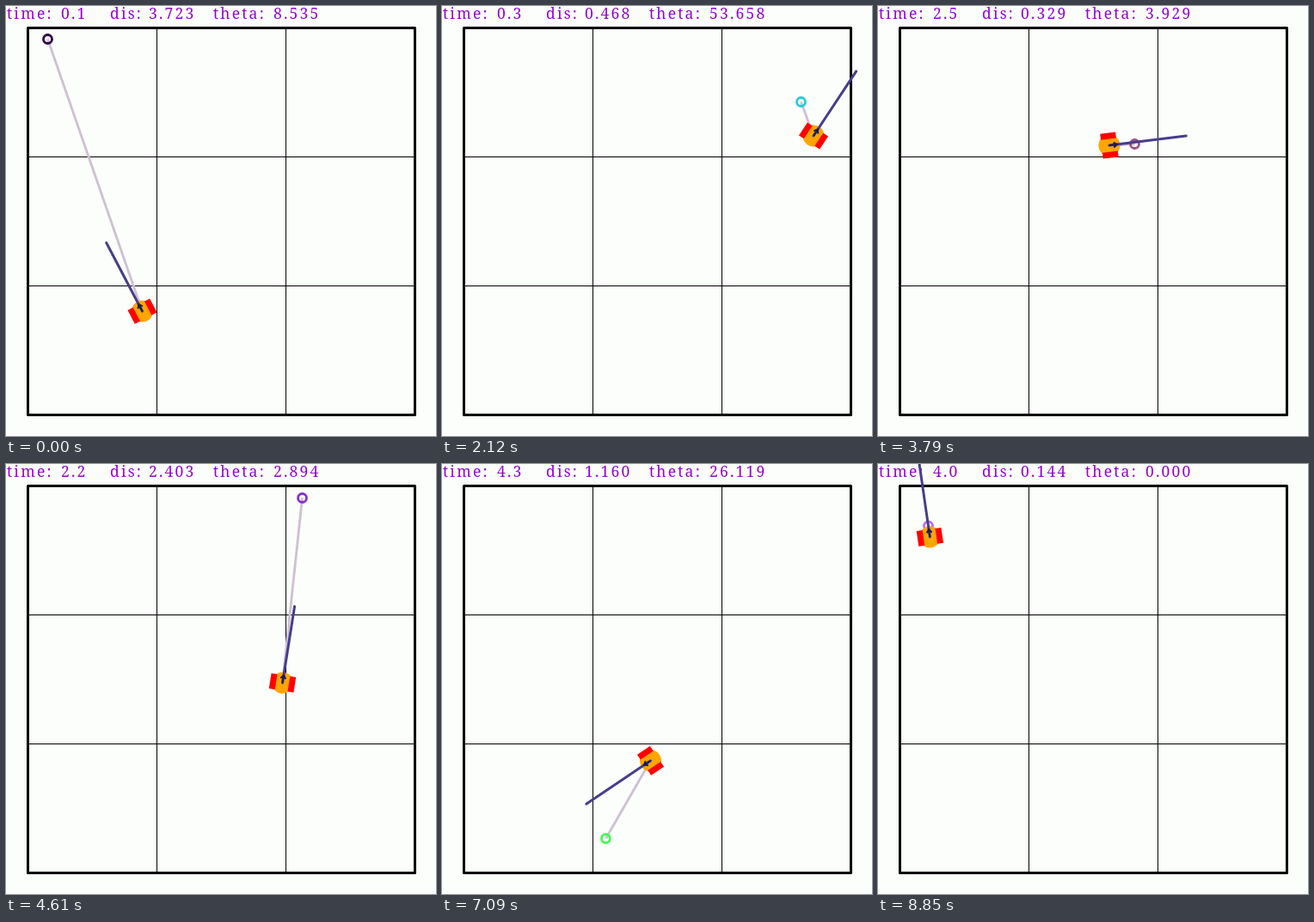
Recreate the animation shown at these times as an HTML page. Size 500 by 500 pixels, loop 8880 ms.

```html
<!DOCTYPE html>
<html lang="en">
<head>
<meta charset="utf-8">
<title>Robot steering to goals</title>
<style>
  html, body { margin: 0; width: 100%; height: 100%; overflow: hidden; background: #fcfefc; }
  svg { display: block; width: 500px; height: 500px; }
  text { font: 17.5px "Noto Serif", serif; letter-spacing: 2.2px; fill: #9400d3; }
</style>
</head>
<body>
<svg viewBox="0 0 500 500">
  <path d="M175.5 25V475M325.5 25V475M25 175.5H475M25 325.5H475" stroke="#000"/>
  <rect x="25.5" y="25.5" width="450" height="450" fill="none" stroke="#000" stroke-width="3" stroke-linejoin="round"/>
  <text x="1" y="15">time:</text><text id="time" x="64" y="15"></text>
  <text x="121" y="15">dis:</text><text id="dis" x="166" y="15"></text>
  <text x="241" y="15">theta:</text><text id="theta" x="311" y="15"></text>
  <line id="sight" stroke="#cfc0d3" stroke-width="2.8"/>
  <circle id="goal" r="5" fill="none" stroke-width="2.8"/>
  <g id="robot">
    <circle r="12.5" fill="#ffa500"/>
    <path d="M-14.5-9h7v18h-7zM7.5-9h7v18h-7z" fill="#f00"/>
    <path d="M0 0V-90" stroke="#483d8b" stroke-width="3" stroke-linecap="round"/>
    <path d="M-3-5L0-9L3-5M0 0V-9" fill="none" stroke="#1c1a55" stroke-width="2"/>
  </g>
</svg>
<script>
const LOOP = 8880, STEPS = 266, UNIT = 90, STOP = 13;

// Each run: goal, then key poses [step, x, y, heading in degrees clockwise from up].
const runs = [
  { goal: [48.5, 38.5], poses: [[0, 158.5, 355, -27.7]] },
  { goal: [350, 225], poses: [[34, 150, 362, 40]] },
  { goal: [417.5, 111.5], poses: [[62, 424, 163, 50], [64, 432, 151, 33.5]] },
  { goal: [409, 350], poses: [[70, 235, 410, 55]] },
  { goal: [298.5, 160.5], poses: [[90, 75, 166, 137.7]] },
  { goal: [344.5, 39.5], poses: [[117, 288, 455, 13], [138, 321.5, 254.5, 9]] },
  { goal: [271, 227], poses: [[160, 205, 306, 60]] },
  { goal: [190.5, 435.5], poses: [[171, 435.5, 47, 223]  , [213, 242.5, 345, 236]] },
  { goal: [58.5, 72], poses: [[226, 115, 462, -20]] }
];

const el = id => document.getElementById(id);
const rad = Math.PI / 180;
const bearing = (x, y, [gx, gy]) => Math.atan2(gx - x, y - gy) / rad;

function set(node, attrs) {
  for (const key in attrs) node.setAttribute(key, attrs[key]);
}

// Every run ends just short of its goal, facing it.
runs.forEach(({ goal, poses }, i) => {
  const [, x, y] = poses.at(-1);
  const end = i + 1 < runs.length ? runs[i + 1].poses[0][0] : STEPS;
  const facing = bearing(x, y, goal);
  poses.push([end - 1, goal[0] - STOP * Math.sin(facing * rad),
    goal[1] + STOP * Math.cos(facing * rad), facing]);
});

// The ring takes a new random colour at each step.
function ringColour(step) {
  const channel = i => {
    const v = Math.sin(step * 12.9898 + i * 78.233) * 43758.5453;
    return Math.floor((v - Math.floor(v)) * 256);
  };
  return `rgb(${channel(1)},${channel(2)},${channel(3)})`;
}

// Cubic path through the poses; the robot always faces along its path.
function poseAt(poses, step) {
  const i = poses.findIndex(p => p[0] >= step && p !== poses[0]);
  const [s0, x0, y0, h0] = poses[i - 1], [s1, x1, y1, h1] = poses[i];
  const u = (step - s0) / (s1 - s0), len = Math.hypot(x1 - x0, y1 - y0);
  const curve = (a, b, m, n) => {
    const q = 3 * (b - a) - 2 * m - n, c = 2 * (a - b) + m + n;
    return [a + u * (m + u * (q + u * c)), m + u * (2 * q + u * 3 * c)];
  };
  const [x, dx] = curve(x0, x1, len * Math.sin(h0 * rad), len * Math.sin(h1 * rad));
  const [y, dy] = curve(y0, y1, -len * Math.cos(h0 * rad), -len * Math.cos(h1 * rad));
  return { x, y, heading: Math.atan2(dx, -dy) / rad };
}

function draw(step) {
  const { goal, poses } = runs.findLast(r => r.poses[0][0] <= step);
  const [gx, gy] = goal;
  const { x, y, heading } = poseAt(poses, step);
  const theta = Math.abs((bearing(x, y, goal) - heading + 540) % 360 - 180);

  el("time").textContent = ((step - poses[0][0] + 1) / 10).toFixed(1);
  el("dis").textContent = (Math.hypot(gx - x, gy - y) / UNIT).toFixed(3);
  el("theta").textContent = theta.toFixed(3);
  set(el("sight"), { x1: x, y1: y, x2: gx, y2: gy });
  set(el("goal"), { cx: gx, cy: gy, stroke: ringColour(step) });
  set(el("robot"), { transform: `translate(${x} ${y}) rotate(${heading})` });
}

const start = performance.now();
function tick() {
  const t = (performance.now() - start) % LOOP;
  draw(Math.min(STEPS - 1, Math.floor(t * 0.03 + 0.45)));
  requestAnimationFrame(tick);
}
tick();
</script>
</body>
</html>
```
